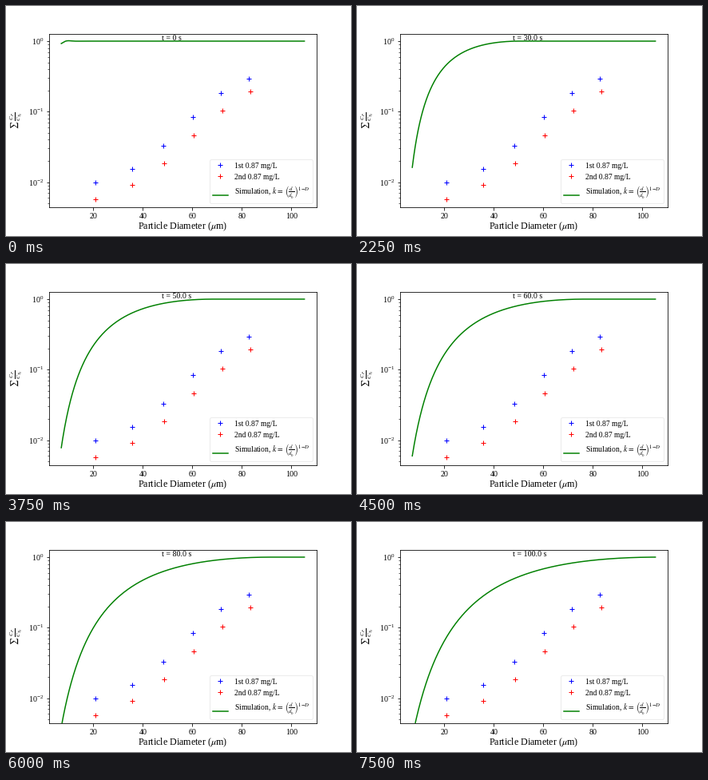
A matplotlib script for the animation above (8000 ms loop, 432 px wide and 288 px high).

```python
import numpy as np
import matplotlib.pyplot as plt
from matplotlib.animation import FuncAnimation

plt.rcParams.update({
    "font.family": "Liberation Serif",
    "mathtext.fontset": "stix",
    "font.size": 10,
})

STEP = 10.0      # simulated seconds per update
HOLD = 3         # animation frames per update
D_MIN, D_MAX = 7.0, 105.3

diam = np.linspace(D_MIN, D_MAX, 500)


def cumulative(t):
    """Cumulative concentration fraction at each diameter after t seconds."""
    z = diam - D_MIN
    if t == 0:
        depth = 0.034 * np.exp(-z / 1.8) * np.cos(np.pi * z / 3.6)
    else:
        first = 2 * np.log10(1 + 0.451 * t ** 0.8)
        u = np.clip(z / (4.11 * t ** 0.69), 0, 1)
        depth = first * (1 - u) ** 1.85 / (1 + 5 * u)
    return 10 ** -depth


def measured(spread, low, high, bow, wave):
    """Six samples: a log-linear rise with a slight bow and S-shape."""
    i = np.arange(6)
    s = i / 5
    x = 20.9 + spread * i ** 0.893
    y = (low + (high - low) * s
         - bow * np.sin(np.pi * s) - wave * np.sin(2 * np.pi * s))
    return x, 10 ** y


fig = plt.figure(figsize=(6, 4), dpi=72)
ax = fig.add_axes([0.125, 0.125, 0.775, 0.755])

ax.plot(*measured(14.7, -2.009, -0.529, 0.007, 0.097), "b+",
        label="1st 0.87 mg/L")
ax.plot(*measured(14.85, -2.244, -0.712, 0.061, 0.074), "r+",
        label="2nd 0.87 mg/L")
curve, = ax.plot(
    diam, cumulative(0), "g-",
    label=r"Simulation, $k\,{=}\,\left(\frac{d}{d_0}\right)^{1{-}D}$")
clock = ax.text(47.6, 1.03, "")

ax.set_yscale("log")
ax.set_xlim(2.085, 110.2)
ax.set_ylim(0.00441, 1.279)
ax.set_xlabel(r"Particle Diameter ($\mu$m)", fontsize=12, labelpad=1)
ax.set_ylabel(r"$\sum\;\frac{C_P}{C_{T_0}}$", fontsize=9.5, labelpad=5)

legend = ax.legend(loc="lower right", fontsize=9.6, edgecolor="0.9")
key = legend.get_lines()[-1]
key.set_ydata(np.array(key.get_ydata()) - 5)  # sit on the text's baseline


def update(i):
    n = i // HOLD
    t = n * STEP
    curve.set_ydata(cumulative(t))
    clock.set_text(f"t = {t:.1f} s" if n else "t = 0 s")
    return curve, clock


anim = FuncAnimation(fig, update, frames=32, interval=250,
                     repeat=True, repeat_delay=0)
plt.show()
```
